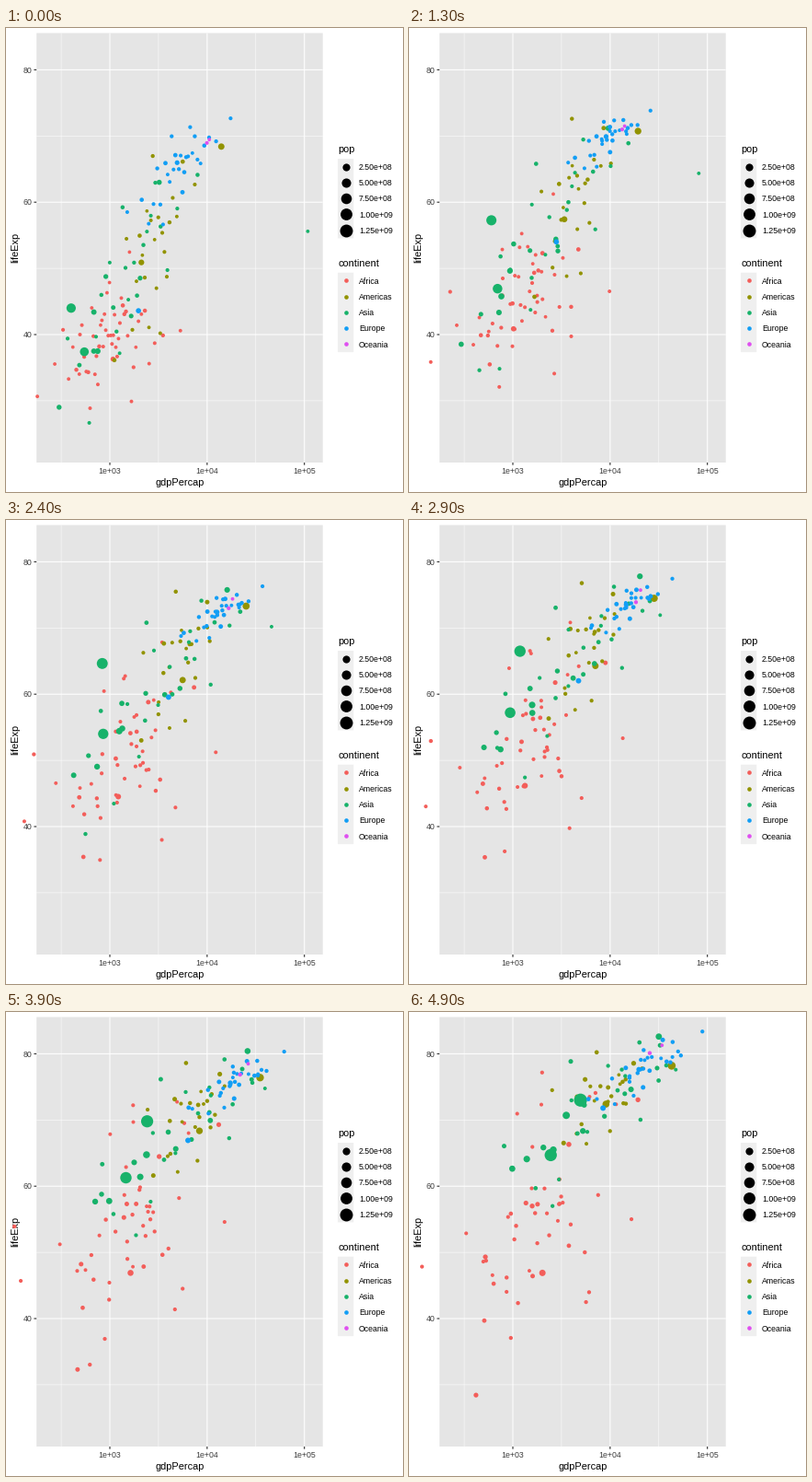
Animation of 432x504 px, one loop 5000 ms. Source, as a matplotlib script:

```python
import numpy as np
import matplotlib.pyplot as plt
from matplotlib.animation import FuncAnimation
from matplotlib.patches import Rectangle

W, H, FRAMES, INTERVAL = 432, 504, 50, 100
LEFT, RIGHT, TOP, BOTTOM = 33.2, 344.7, 5.5, 472.0
PER_DECADE, PER_YEAR = 105.85, 7.19
START, END = 52, 107  # years counted from 1900
KEYS = [START, 67, 87, END]
YEARS = np.linspace(START, END, FRAMES)

# Countries that stand out: population in millions at the end, GDP per head,
# life expectancy and, where needed, own key years.
LARGE = {
    "Africa": [
        (135, [1077, 1014, 1385, 2014], [36.3, 41.0, 46.9, 46.9]),
        (9, [493, 848, 737, 590, 863], [40.0, 44.0, 23.6, 36.1, 46.2],
         [START, 87, 92, 97, END]),
    ],
    "Americas": [
        (301, [13990, 19530, 29884, 42952], [68.4, 70.8, 75.0, 78.2]),
        (190, [2109, 3430, 7807, 9066], [50.9, 57.6, 65.2, 72.4]),
    ],
    "Asia": [
        (150, [684, 721, 752, 1391], [37.5, 43.5, 52.8, 64.1]),
        (14, [368, 525, 624, 1714], [39.4, 31.2, 51.0, 59.7], [START, 77, 82, END]),
        (1319, [400, 576, 488, 613, 741, 1379, 4959],
         [44.0, 50.5, 44.5, 58.4, 64.0, 67.3, 73.0], [START, 57, 62, 67, 77, 87, END]),
        (1110, [547, 701, 977, 2452], [37.4, 47.2, 58.6, 64.7]),
        (224, [750, 762, 1748, 3541], [37.5, 46.0, 60.1, 70.7]),
        (127, [3217, 9848, 22376, 31656], [63.0, 71.4, 78.7, 82.6]),
        (2.5, [108382, 80895, 109348, 31354, 47307],
         [55.6, 64.6, 67.7, 71.3, 77.6], [START, 67, 72, 82, END]),
        (169, [685, 942, 1705, 2606], [43.4, 49.8, 58.2, 65.5]),
    ],
    "Europe": [(71, [1969, 2826, 5089, 8458], [43.6, 54.3, 63.1, 71.8])],
    "Oceania": [],
}

# The remaining countries: how many, how closely life expectancy follows GDP,
# how far ranks drift, population growth and typical population, then mean and
# spread of log GDP and of life expectancy at the key years.
CROWD = {
    "Africa": (50, 0.5, 0.9, 3.6, 9,
               [2.99, 3.10, 3.18, 3.24], [0.28, 0.33, 0.37, 0.44],
               [39.2, 45.4, 53.4, 55.0], [5.0, 6.0, 7.6, 9.3]),
    "Americas": (23, 0.65, 0.5, 2.3, 9,
                 [3.46, 3.64, 3.76, 3.92], [0.19, 0.20, 0.20, 0.25],
                 [53.0, 60.4, 68.1, 73.6], [8.8, 7.5, 5.5, 4.0]),
    "Asia": (25, 0.78, 0.5, 2.6, 20,
             [3.19, 3.36, 3.66, 3.86], [0.32, 0.42, 0.48, 0.52],
             [48.0, 55.5, 65.8, 71.8], [9.0, 8.5, 7.0, 6.5]),
    "Europe": (29, 0.82, 0.4, 1.35, 10,
               [3.71, 3.99, 4.23, 4.36], [0.23, 0.18, 0.18, 0.24],
               [65.2, 69.8, 74.0, 77.9], [4.5, 2.3, 2.1, 2.8]),
    "Oceania": (2, 0.9, 0.0, 2.2, 9,
                [4.01, 4.14, 4.31, 4.47], [0.02, 0.02, 0.04, 0.10],
                [69.2, 71.3, 75.3, 80.7], [0.3, 0.3, 1.2, 0.7]),
}
COLORS = dict(zip(CROWD, ["#f35e5a", "#929300", "#17b26a", "#129ef5", "#df50f0"]))


def px(log_gdp):
    return 113.0 + (log_gdp - 3) * PER_DECADE


def py(life):
    return 45.4 + (80 - life) * PER_YEAR


def dot_area(size):
    """Marker area in square pixels for a point size in millimetres."""
    radius = 0.375 * (2.845 * size + 0.945) + 0.35
    return (2 * radius) ** 2


def pop_size(millions):
    return 1 + 5 * np.sqrt(np.clip(millions / 1318.7, 0, 1))


def even_scores(rng, n):
    """Shuffled, evenly spread scores with about unit variance."""
    u = (rng.permutation(n) + 0.5) / n
    return np.log(u / (1 - u)) / 1.75


def crowd_rows(rng, spec):
    n, follow, drift, _, typical, gdp, gdp_spread, life, life_spread = spec
    wealth, new_wealth, health, new_health = (even_scores(rng, n) for _ in range(4))
    pops = typical * np.exp(rng.normal(0, 1.0, n))
    angle = drift * (np.array(KEYS) - START) / (END - START)
    for i in range(n):
        z = np.cos(angle) * wealth[i] + np.sin(angle) * new_wealth[i]
        w = np.cos(angle) * health[i] + np.sin(angle) * new_health[i]
        score = follow * z + np.sqrt(1 - follow ** 2) * w
        yield (min(pops[i], 110), 10 ** (gdp + np.multiply(gdp_spread, z)),
               life + np.multiply(life_spread, score))


def build_paths():
    """Pixel x, pixel y and marker area, each shaped (frames, countries)."""
    rng = np.random.default_rng(7)
    xs, ys, areas, colors = [], [], [], []
    for name, spec in CROWD.items():
        growth = spec[3] ** ((YEARS - END) / (END - START))
        for pop, gdp, life, *own in [*crowd_rows(rng, spec), *LARGE[name]]:
            keys = own[0] if own else KEYS
            xs.append(px(np.interp(YEARS, keys, np.log10(gdp))))
            ys.append(py(np.interp(YEARS, keys, life)))
            areas.append(dot_area(pop_size(pop * growth)))
            colors.append(COLORS[name])
    return np.array(xs).T, np.array(ys).T, np.array(areas).T, colors


plt.rcParams["font.family"] = "Liberation Sans"
fig = plt.figure(figsize=(W / 72, H / 72), dpi=72, facecolor="white")
ax = fig.add_axes([0, 0, 1, 1])
ax.set(xlim=(0, W), ylim=(H, 0))
ax.axis("off")


def box(x, y, w, h, color):
    ax.add_patch(Rectangle((x, y), w, h, fc=color, lw=0, zorder=0, snap=False))


def line(x, y, color="white", width=1.07):
    ax.plot(x, y, color=color, lw=width, zorder=1, snap=False, solid_capstyle="butt")


def label(x, y, text, size=8.8, color="black", **kw):
    ax.text(x, y, text, fontsize=size, color=color, va="baseline", **kw)


def draw_panel():
    box(LEFT, TOP, RIGHT - LEFT, BOTTOM - TOP, "#e5e5e5")
    for decade in (2.5, 3.5, 4.5):
        line([px(decade)] * 2, [TOP, BOTTOM], width=0.53)
    for life in (30, 50, 70):
        line([LEFT, RIGHT], [py(life)] * 2, width=0.53)
    for decade in (3, 4, 5):
        x = px(decade)
        line([x, x], [TOP, BOTTOM])
        line([x, x], [BOTTOM, BOTTOM + 2.75], "#262626")
        label(x, 484, f"1e+0{decade}", color="#3d3d3d", ha="center")
    for life in (40, 60, 80):
        y = py(life)
        line([LEFT, RIGHT], [y, y])
        line([LEFT - 2.75, LEFT], [y, y], "#262626")
        label(28.3, y + 3.2, str(life), color="#3d3d3d", ha="right")
    label((LEFT + RIGHT) / 2, 496.8, "gdpPercap", 11, ha="center")
    label(13.4, (TOP + BOTTOM) / 2, "lifeExp", 11, ha="center",
          rotation=90, rotation_mode="anchor")


def draw_legend(title, top, entries):
    key = 17.28
    label(361, top - 6.8, title, 11)
    box(361, top, key, key * len(entries), "#efefef")
    for i, (text, color, size) in enumerate(entries):
        y = top + key * (i + 0.5)
        ax.scatter(361 + key / 2, y, s=dot_area(size), c=color, lw=0, zorder=2)
        label(384, y + 3.2, text)


draw_panel()
draw_legend("pop", 142.0, [(f"{p * 1e6:.2e}", "black", pop_size(p))
                           for p in range(250, 1251, 250)])
draw_legend("continent", 265.7, [(name, c, 1.5) for name, c in COLORS.items()])

X, Y, AREA, DOT_COLORS = build_paths()
dots = ax.scatter(X[0], Y[0], s=AREA[0], c=DOT_COLORS, lw=0, zorder=3)


def update(frame):
    dots.set_offsets(np.column_stack([X[frame], Y[frame]]))
    dots.set_sizes(AREA[frame])
    return (dots,)


anim = FuncAnimation(fig, update, frames=FRAMES, interval=INTERVAL,
                     repeat=True, repeat_delay=0)
plt.show()
```
